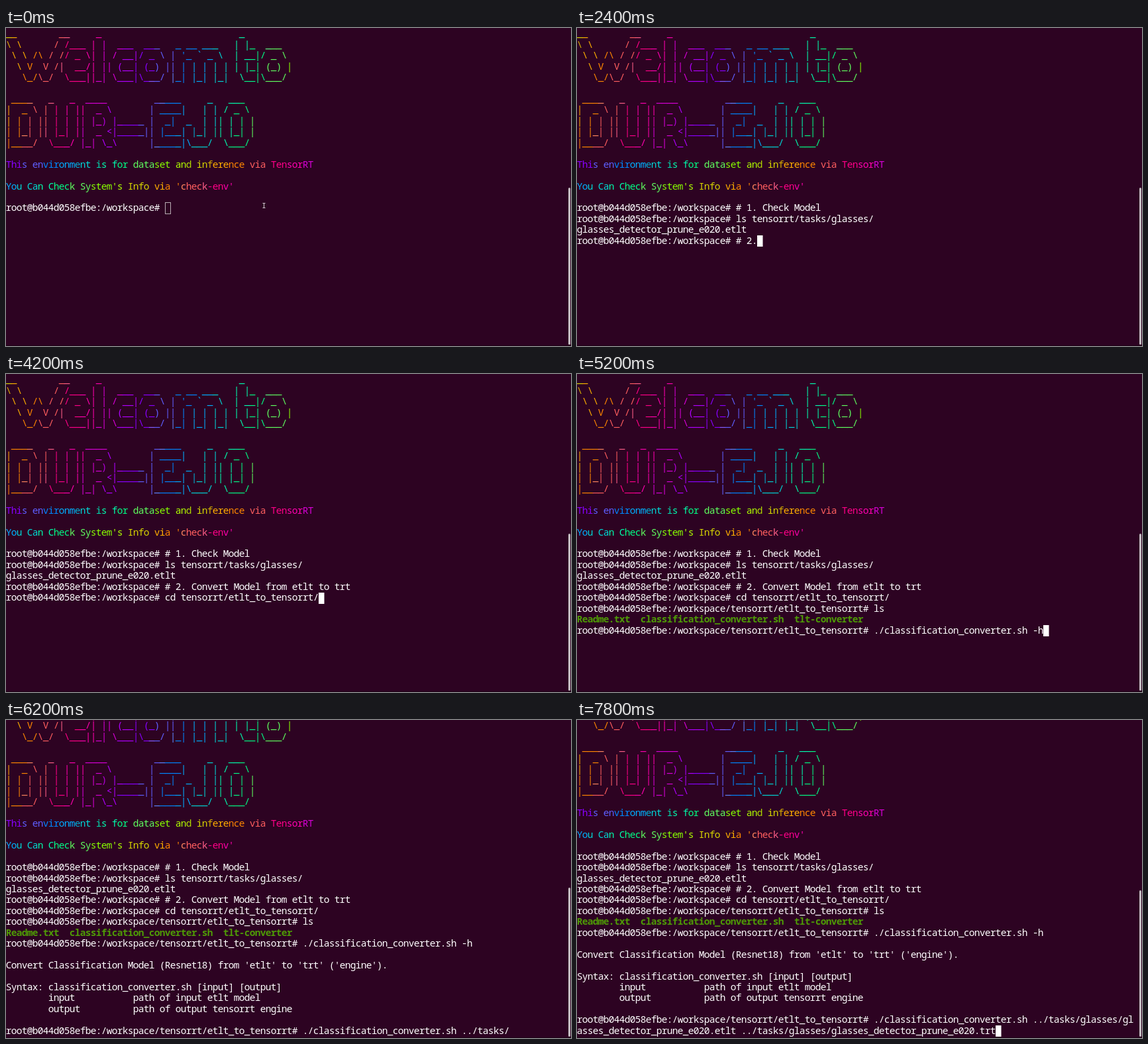
An HTML page with a canvas for the animation above (8000 ms loop, 853 by 480 pixels).

```html
<!DOCTYPE html>
<html lang="en">
<head>
<meta charset="utf-8">
<title>Terminal session</title>
<style>
  html, body { margin: 0; width: 100%; height: 100%; overflow: hidden; background: #2d0322; }
  canvas { display: block; width: 853px; height: 480px; }
</style>
</head>
<body>
<canvas id="stage" width="853" height="480"></canvas>
<script>
const ctx = document.getElementById('stage').getContext('2d');
const LOOP = 8000, TICK = 200;
const CELL_W = 8, CELL_H = 16.45, TOP = 0.6, BASE = 12.6;
const COLS = 105, ROWS = 29;
const FONT = '14.5px "Noto Sans Mono", "DejaVu Sans Mono", monospace';
const WHITE = '#ffffff', GREEN = '#4e9a06', BACK = '#2d0322';

const welcome = [
  String.raw`__        __     _                          _`,
  String.raw`\ \      / /___ | |  ___  ___   _ __ ___   | |_  ___`,
  String.raw` \ \ /\ / // _ \| | / __|/ _ \ | '_ ${'`'} _ \  | __|/ _ \ `,
  String.raw`  \ V  V /|  __/| || (__| (_) || | | | | | | |_| (_) |`,
  String.raw`   \_/\_/  \___||_| \___|\___/ |_| |_| |_|  \__|\___/`
];

const project = [
  String.raw` ____   _   _  ____         _____     _   ___`,
  String.raw`|  _ \ | | | ||  _ \       | ____|   | | / _ \ `,
  String.raw`| | | || | | || |_) |_____ |  _|  _  | || | | |`,
  String.raw`| |_| || |_| ||  _ <|_____|| |___| |_| || |_| |`,
  String.raw`|____/  \___/ |_| \_\      |_____|\___/  \___/`
];

// Rainbow colour reduced to the 6-level terminal cube
const LEVELS = [0, 95, 135, 175, 215, 255];
function rainbow(deg) {
  const part = shift => {
    const v = Math.sin((deg + shift) * Math.PI / 180) * 127 + 128;
    return LEVELS[Math.floor(v / 256 * 6)];
  };
  return `rgb(${part(0)},${part(120)},${part(240)})`;
}

const line = (text, color = WHITE, bold = false) => ({ text, color, bold });
const tinted = (rows, start) =>
  rows.map((text, r) => line(text, col => rainbow(start + 5.65 * col + 1.5 * r)));

const header = [
  ...tinted(welcome, 40), line(''),
  ...tinted(project, 57), line(''),
  ...tinted(['This environment is for dataset and inference via TensorRT'], 186), line(''),
  ...tinted(["You Can Check System's Info via 'check-env'"], 252), line('')
];

const HOME = 'root@b044d058efbe:/workspace# ';
const DEEP = 'root@b044d058efbe:/workspace/tensorrt/etlt_to_tensorrt# ';
const SCRIPT = './classification_converter.sh ';
const MODEL = '../tasks/glasses/glasses_detector_prune_e020';

// keys: typed length (or literal input) at each tick
const commands = [
  { prompt: HOME, text: '# 1. Check Model', keys: [0, 1, 4, 9, 13, 16] },
  { prompt: HOME, text: 'ls tensorrt/tasks/glasses/', keys: ['cd ', 0, 4, 12, 26],
    out: [line('glasses_detector_prune_e020.etlt')] },
  { prompt: HOME, text: '# 2. Convert Model from etlt to trt', keys: [1, 4, 8, 14, 19, 26, 35] },
  { prompt: HOME, text: 'cd tensorrt/etlt_to_tensorrt/', keys: [0, 4, 12, 29] },
  { prompt: DEEP, text: 'ls', keys: [1],
    out: [line('Readme.txt  classification_converter.sh  tlt-converter', GREEN, true)] },
  { prompt: DEEP, text: SCRIPT + '-h', keys: [0, 7, 30, 32],
    out: [
      '', "Convert Classification Model (Resnet18) from 'etlt' to 'trt' ('engine').",
      '', 'Syntax: classification_converter.sh [input] [output]',
      '        input           path of input etlt model',
      '        output          path of output tensorrt engine', ''
    ].map(text => line(text)) },
  { prompt: DEEP, text: `${SCRIPT}${MODEL}.etlt ${MODEL}.trt`,
    keys: [0, 7, 30, 35, 39, 41, 47, 79, 83, 89, 97, 104, 128] }
];

function wrap(text) {
  const rows = [];
  for (let i = 0; i === 0 || i < text.length; i += COLS) rows.push(line(text.slice(i, i + COLS)));
  return rows;
}

function screenAt(tick) {
  const rows = [...header];
  for (const { prompt, text, keys, out = [] } of commands) {
    if (tick < keys.length) {
      const key = keys[tick];
      rows.push(...wrap(prompt + (typeof key === 'string' ? key : text.slice(0, key))));
      break;
    }
    tick -= keys.length;
    rows.push(...wrap(prompt + text), ...out);
  }
  return rows;
}

function drawRow({ text, color, bold }, y) {
  ctx.font = `${bold ? 700 : 500} ${FONT}`;
  [...text].forEach((ch, col) => {
    if (ch === ' ') return;
    ctx.fillStyle = typeof color === 'function' ? color(col) : color;
    ctx.fillText(ch, (col + 0.5) * CELL_W, y + BASE);
  });
}

function drawCursor(x, y, focused) {
  const top = Math.round(y);
  if (focused) {
    ctx.fillStyle = WHITE;
    ctx.fillRect(x, top, CELL_W + 0.5, 17);
  } else {
    ctx.strokeStyle = '#b8acb4';
    ctx.lineWidth = 1;
    ctx.strokeRect(x + 0.5, top - 0.5, CELL_W, 17);
  }
}

function drawPointer(x, y) {
  ctx.fillStyle = '#d0c8ce';
  ctx.fillRect(x - 0.5, y - 3, 1, 6);
  ctx.fillRect(x - 2, y - 4, 4, 1);
  ctx.fillRect(x - 2, y + 3, 4, 1);
}

function draw(tick) {
  const rows = screenAt(tick);
  const scroll = Math.max(0, rows.length - ROWS);
  const rowY = r => TOP + (r - scroll) * CELL_H;

  ctx.fillStyle = BACK;
  ctx.fillRect(0, 0, 853, 480);
  ctx.textAlign = 'center';
  ctx.textBaseline = 'alphabetic';
  rows.forEach((row, r) => drawRow(row, rowY(r)));

  const last = rows.length - 1;
  const blinkedOff = tick === 31;
  if (!blinkedOff) drawCursor(rows[last].text.length * CELL_W, rowY(last), tick > 0);
  if (tick === 0) drawPointer(389.5, 268);

  const thumb = 241 + 4 * scroll;
  ctx.fillStyle = '#c6bfc4';
  ctx.beginPath();
  ctx.roundRect(849, thumb, 3, 478 - thumb, 1.5);
  ctx.fill();
  ctx.fillStyle = '#1c0116';
  ctx.fillRect(0, 479, 853, 1);
}

let shown = -1;
function frame() {
  const tick = Math.floor(performance.now() % LOOP / TICK);
  if (tick !== shown) draw(shown = tick);
  requestAnimationFrame(frame);
}
frame();
</script>
</body>
</html>
```
